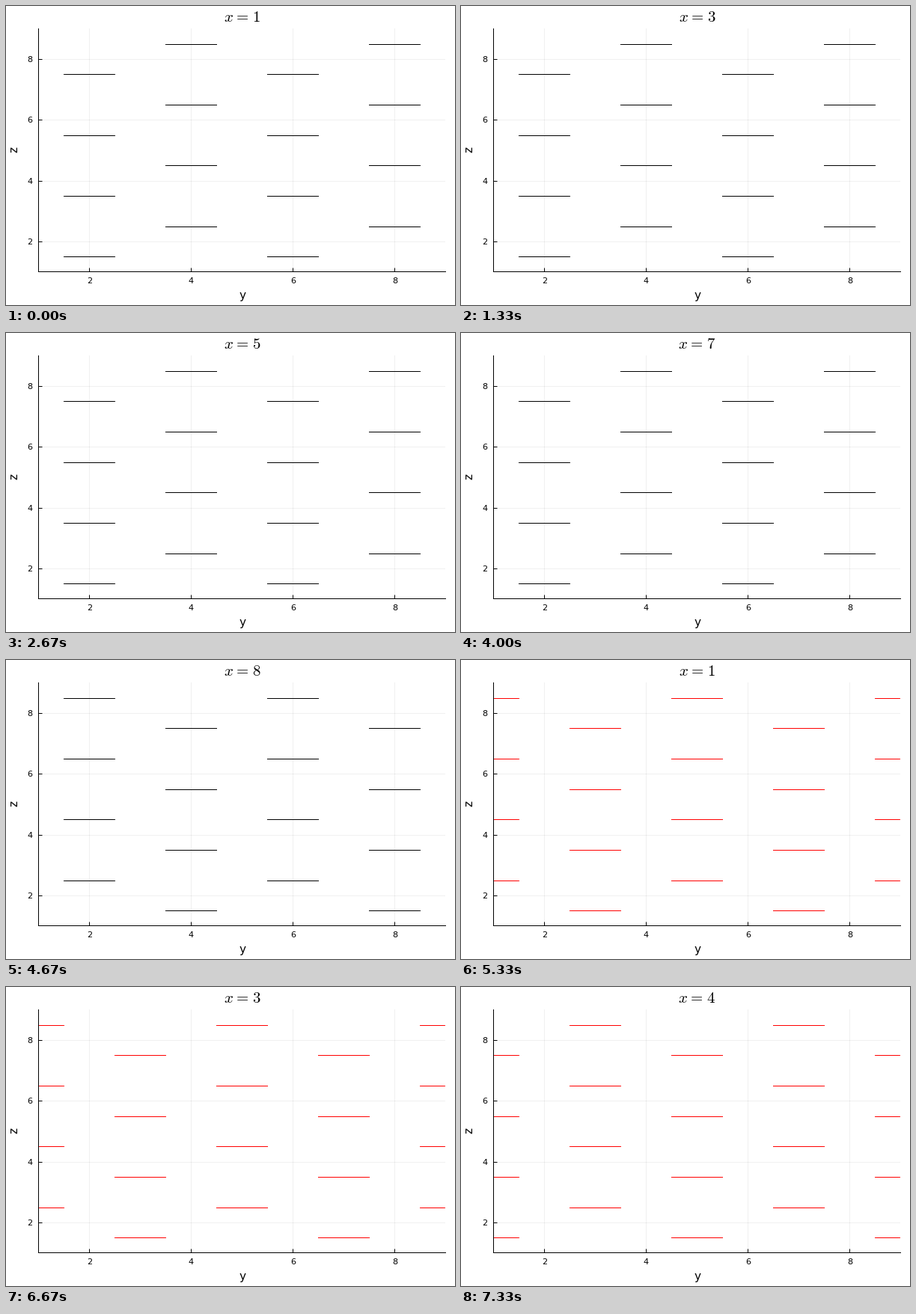
Animation of 600 by 400 pixels, one loop 8000 ms. Source, as a matplotlib script:

```python
import matplotlib.pyplot as plt
from matplotlib.animation import FuncAnimation
import numpy as np

W, H, DPI = 600, 400, 100
PX = 72 / DPI  # one pixel in points
FRAMES, INTERVAL = 200, 40
plt.rcParams.update({"font.family": "DejaVu Sans", "mathtext.fontset": "cm"})

fig = plt.figure(figsize=(W / DPI, H / DPI), dpi=DPI, facecolor="white")
ax = fig.add_axes([43.45 / W, 44.55 / H, 544 / W, 325 / H])
ax.set(xlim=(1, 9), ylim=(1, 9), xticks=range(2, 9, 2), yticks=range(2, 9, 2))
ax.set_axisbelow(True)
ax.grid(color="black", alpha=0.06, lw=PX)
ax.tick_params(direction="in", length=5 * PX, width=PX, labelsize=8)
ax.tick_params(axis="x", pad=7.5 * PX)
ax.tick_params(axis="y", pad=8.3 * PX)
ax.spines[["top", "right"]].set_visible(False)
ax.spines[["left", "bottom"]].set_linewidth(PX)


def label(x, y, text, size, **kw):
    return fig.text(x / W, 1 - y / H, text, size=size, ha="center", **kw)


label(315.5, 392, "y", 11, va="baseline")
label(11, 191.5, "z", 11, va="center", rotation=90)
title = label(315.5, 21, "", 15, va="baseline")
bars = ax.hlines([], [], [], lw=PX)
bars.set_capstyle("projecting")

# (x, first column centre, colour)
STEPS = [(x, 2, "black") for x in range(1, 9)]
STEPS += [(x, 1, "red") for x in range(1, 5)]


def draw(i):
    # each step begins on the tick that contains its start time
    n = len(STEPS)
    x, first, color = STEPS[(n * (i + 1) - 1) // FRAMES]
    segments = []
    for col, y in enumerate(range(first, 10, 2)):
        # neighbouring columns and slices alternate between odd and even layers
        odd = (col + x + (first == 2)) % 2
        segments += [[(y - 0.5, z), (y + 0.5, z)]
                     for z in np.arange(1.5 + odd, 9, 2)]
    bars.set_segments(segments)
    bars.set_color(color)
    title.set_text(rf"$x\hspace{{0.078}}=\hspace{{0.078}}{x}$")
    return bars, title


anim = FuncAnimation(fig, draw, frames=FRAMES, interval=INTERVAL,
                     repeat=True, repeat_delay=0)
plt.show()
```
